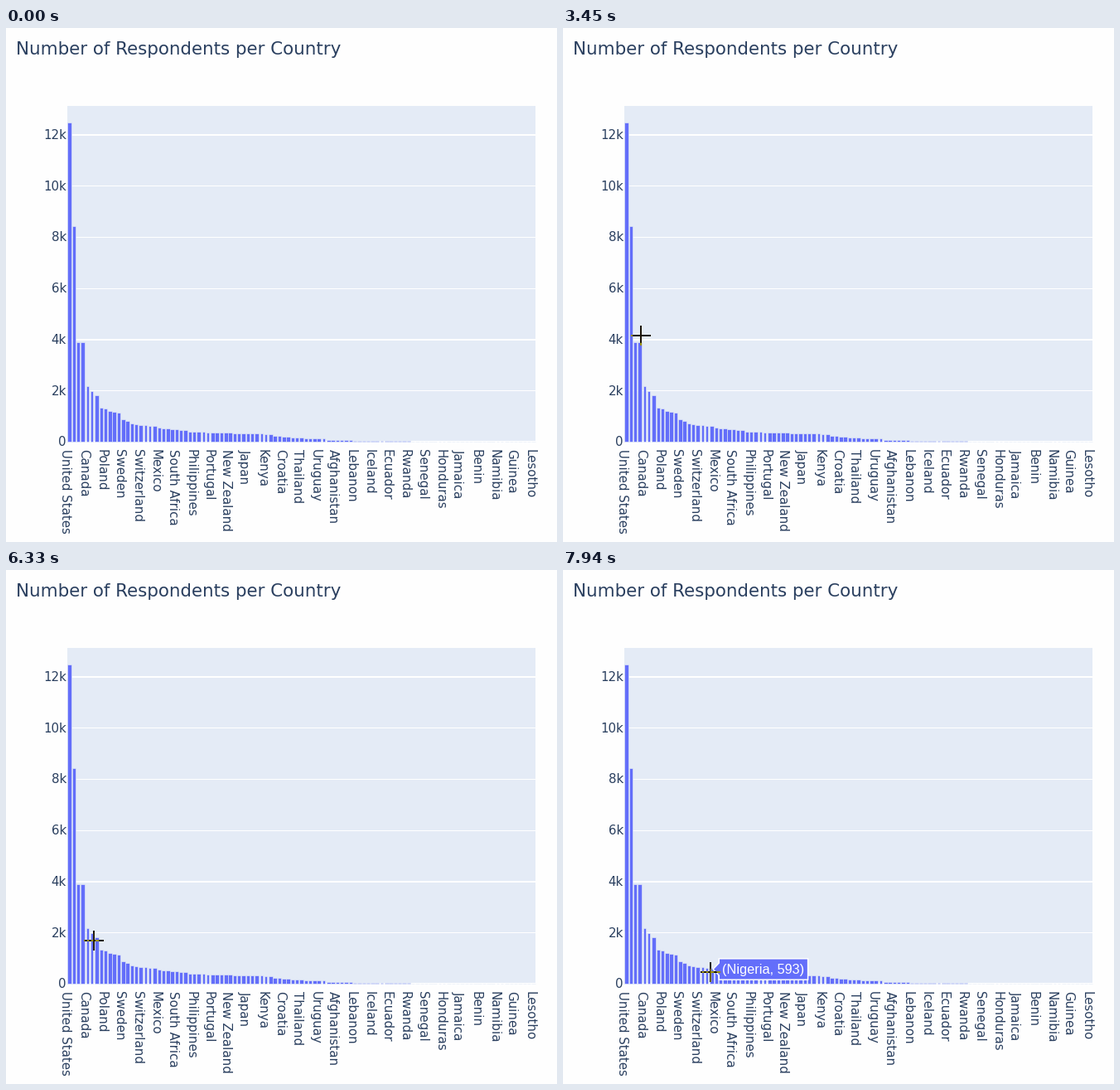
Recreate the animation shown at these times as a matplotlib script. Size 665 px wide and 620 px high, loop 8000 ms.

```python
import numpy as np
import matplotlib.pyplot as plt
from matplotlib.animation import FuncAnimation
from matplotlib.collections import PolyCollection
from matplotlib.colors import to_rgb
from matplotlib.patches import Polygon, Rectangle
from matplotlib.path import Path

W, H, DPI = 665, 620, 100
INTERVAL, LOOP = 40, 8000
LEFT, RIGHT, TOP, BASE = 74, 639, 94, 499
INK, BLUE, PANEL = "#2a3f5f", "#636efa", "#e4ebf6"
ZOOM = 1.25       # screen pixels per layout pixel
BARS = 105
SLOT = (RIGHT - LEFT) / BARS
HALF = 0.4 * SLOT
SCALE = 0.030875  # pixels per respondent
TICK = 73         # ms between pointer steps
LAG = 90          # ms from pointing at a bar to its label

# Counts fall off geometrically between a few ranks.
COUNTS = {0: 12469, 1: 8403, 2: 3896, 3: 3890, 4: 2191, 6: 1818, 7: 1343,
          11: 1117, 12: 886, 15: 670, 19: 593, 28: 405, 44: 300, 52: 150,
          60: 85, 104: 2}
VALUES = np.exp(np.interp(range(BARS), list(COUNTS),
                          np.log(list(COUNTS.values()))))

TICKS = ("United States,Canada,Poland,Sweden,Switzerland,Mexico,South Africa,"
         "Philippines,Portugal,New Zealand,Japan,Kenya,Croatia,Thailand,"
         "Uruguay,Afghanistan,Lebanon,Iceland,Ecuador,Rwanda,Senegal,Honduras,"
         "Jamaica,Benin,Namibia,Guinea,Lesotho").split(",")

HOVER_NAMES = {0: "United States", 1: "India", 2: "United Kingdom",
               3: "Germany", 6: "Brazil", 11: "Italy", 12: "Sweden",
               19: "Nigeria"}

# Pointer moves: start ms, end ms, evenly timed waypoints.
START = (0, 93)
MOVES = [
    (520, 1250, [(30, 103), (74, 110), (83, 119)]),
    (1330, 1330, [(77, 119)]),
    (1850, 2430, [(88, 160), (94, 232), (94, 242)]),
    (2810, 3540, [(83, 250), (86, 310), (94, 368), (94, 372)]),
    (3680, 3820, [(87, 377)]),
    (4260, 4480, [(87, 382)]),
    (4700, 4700, [(91, 382)]),
    (5000, 5000, [(94, 382)]),
    (5140, 5870, [(102, 431)]),
    (5950, 6750, [(106, 447), (123, 460)]),
    (6830, 7580, [(138, 470), (170, 479)]),
    (7640, 7940, [(177, 483), (178, 485)]),
]

ARROW = np.array([(0, 0), (0, 16), (4, 12.5), (7, 18.5), (9.5, 17.5),
                  (6.5, 11.5), (11.5, 11.5)])
ARM = np.array([-1 - 12j, 1 - 12j, 1 - 1j])
CROSS = np.array([(p.real, p.imag) for turn in range(4) for p in ARM * 1j**turn])


def px(size):
    return size * 72 / DPI


def inverse(color):
    return tuple(1 - c for c in to_rgb(color))


def same(color):
    return color


def center(i):
    return LEFT + (i + 0.5) * SLOT


def bar_top(i):
    return BASE - VALUES[i] * SCALE


def snap(v, origin):
    return origin + ZOOM * round((v - origin) / ZOOM)


fig = plt.figure(figsize=(W / DPI, H / DPI), dpi=DPI, facecolor="#fefefe")
ax = fig.add_axes([0, 0, 1, 1])
ax.set(xlim=(0, W), ylim=(H, 0))
ax.axis("off")


def write(x, y, text, size=15, color=INK, font="DejaVu Sans", **kw):
    return ax.text(x, y, text, fontsize=px(size), color=color, family=font,
                   va="baseline", **kw)


def rect(x, y, w, h, color):
    ax.add_patch(Rectangle((x, y), w, h, fc=color, lw=0, zorder=1))


def add_bars(tint, zorder):
    shapes = []
    for i in range(BARS):
        x0, x1 = (snap(center(i) + side, LEFT) for side in (-HALF, HALF))
        top = snap(bar_top(i), BASE)
        shapes.append([(x0, BASE), (x0, top), (x1, top), (x1, BASE)])
    bars = PolyCollection(shapes, facecolors=[tint(BLUE)],
                          edgecolors=[tint(PANEL)], linewidths=px(0.625),
                          zorder=zorder)
    return ax.add_collection(bars, autolim=False)


def add_box(tint, zorder):
    return ax.add_patch(Polygon(CROSS, fc=tint(BLUE), ec=tint("white"),
                                lw=px(1.5), joinstyle="miter", zorder=zorder))


def build_chart():
    write(11.5, 32, "Number of Respondents per Country", 21.4)
    rect(LEFT, TOP, RIGHT - LEFT, BASE - TOP, PANEL)
    for k in range(0, 13, 2):
        y = BASE - k * 1000 * SCALE
        thick = 3 if k == 0 else 1 + (y % 1 == 0.5)
        rect(LEFT, int(y - thick / 2 + 1), RIGHT - LEFT, thick, "white")
        write(73, y + 5.3, f"{k}k" if k else "0", ha="right")
    for i, name in enumerate(TICKS):
        write(center(4 * i) - 9.2, 508, name, rotation=-90, ha="left",
              rotation_mode="anchor")


build_chart()
add_bars(same, 2)
box = add_box(same, 3)
cross = ax.add_patch(Polygon(CROSS, fc=inverse(PANEL), lw=0, zorder=5))
arrow = ax.add_patch(Polygon(ARROW, fc="white", ec="black", lw=px(1), zorder=5))

# Inverted copies show only inside the cross-hair.
bars_inv = add_bars(inverse, 6)
box_inv = add_box(inverse, 7)
label = write(0, 0, "", 16.25, "white", "Liberation Sans", zorder=8)


def pointer(t):
    spot, origin = None, START
    for start, end, points in MOVES:
        if t < start:
            break
        steps = 1 + round((end - start) / TICK)
        pace = (end - start) / (steps - 1) if steps > 1 else 1
        k = min(int((t - start) / pace + 0.3), steps - 1)
        path = [origin, *points]
        knots = np.linspace(0, 1, len(path))
        spot = [round(float(np.interp((k + 1) / steps, knots, axis)))
                for axis in zip(*path)]
        origin = points[-1]
    return spot


def hovered(spot):
    if spot is None or spot[0] < LEFT:
        return None
    i = int((spot[0] - LEFT) / SLOT)
    return i if i in HOVER_NAMES and spot[1] >= bar_top(i) else None


def place_label(i):
    count = round(VALUES[i])
    shown = f"{count / 1000:.3f}k" if count >= 10000 else count
    tip, y = center(i) + HALF, bar_top(i) + 0.8
    x0 = tip + 7.2
    label.set_text(f"({HOVER_NAMES[i]}, {shown})")
    label.set_position((x0 + 4, y + 5.7))
    x1 = x0 + label.get_window_extent().width + 8.2
    shape = [(tip, y), (x0, y + 7.5), (x0, y + 12.7), (x1, y + 12.7),
             (x1, y - 12.7), (x0, y - 12.7), (x0, y - 7.5)]
    box.set_xy(shape)
    box_inv.set_xy(shape)


def update(frame):
    t = frame * INTERVAL + INTERVAL / 2
    spot = pointer(t)
    in_plot = spot is not None and spot[0] >= LEFT
    cross.set_visible(in_plot)
    bars_inv.set_visible(in_plot)
    arrow.set_visible(spot is not None and not in_plot)

    bar = hovered(pointer(t - LAG))
    for part in (box, box_inv, label):
        part.set_visible(bar is not None)
    if bar is not None:
        place_label(bar)

    if in_plot:
        shape = CROSS + spot
        cross.set_xy(shape)
        clip = Path(np.vstack([shape, shape[:1]]), closed=True)
        for part in (bars_inv, box_inv):
            part.set_clip_path(clip, ax.transData)
    elif spot:
        arrow.set_xy(ARROW + spot)
    return cross, arrow, bars_inv, box, box_inv, label


anim = FuncAnimation(fig, update, frames=LOOP // INTERVAL, interval=INTERVAL,
                     init_func=lambda: update(0), repeat=True, repeat_delay=0)
plt.show()
```
